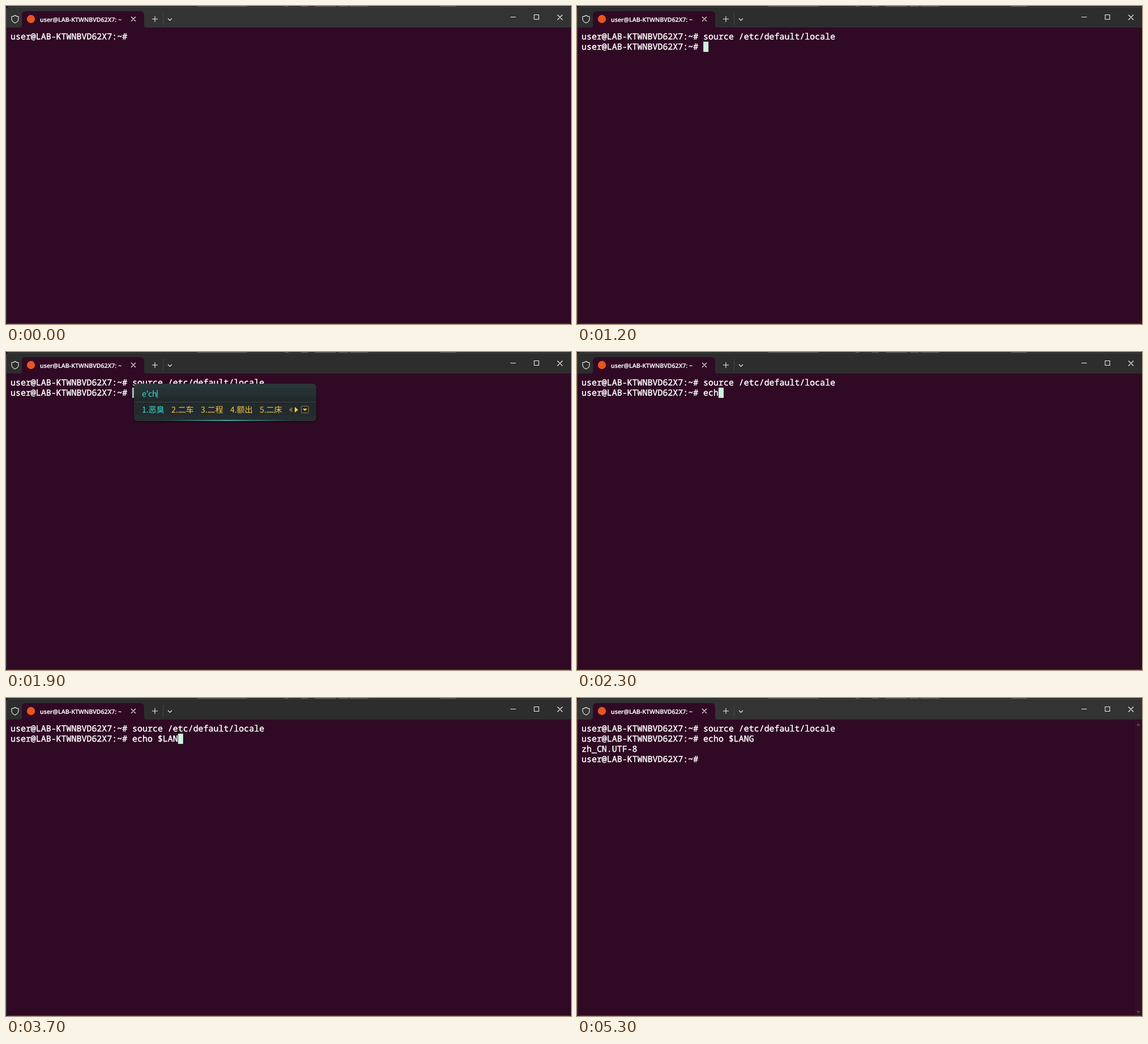
Write an HTML page that moves like this. It is 998x561 px and loops after 5400 ms.

```html
<!DOCTYPE html>
<html lang="en">
<head>
<meta charset="utf-8">
<title>Terminal</title>
<style>
  html, body { margin: 0; width: 100%; height: 100%; overflow: hidden; background: #1c1c1c; }
  svg { display: block; width: 998px; height: 561px; }
  text { white-space: pre; text-rendering: geometricPrecision; }
  .mono { font: 500 14.94px "Noto Sans Mono", "DejaVu Sans Mono", monospace; fill: #fff; stroke: #fff; stroke-width: .45; }
  .mono .inverse { fill: #300a24; stroke: #300a24; }
  .title { font: 600 10.6px "Open Sans", "Noto Sans", sans-serif; fill: #fff; stroke: #fff; stroke-width: .2; }
  .ime { font: 14.3px "Noto Sans CJK SC", "Noto Sans CJK", sans-serif; letter-spacing: -.2px; fill: #f2c443; }
  .ime.active { fill: #34dcd2; }
  .icon { fill: none; stroke: #f2f2f2; stroke-width: 1.1; }
</style>
</head>
<body>
<svg viewBox="0 0 998 561">
  <defs>
    <linearGradient id="panel" x2="0" y2="1">
      <stop stop-color="#2b3739"/><stop offset=".5" stop-color="#20282a"/><stop offset="1" stop-color="#262f31"/>
    </linearGradient>
    <linearGradient id="glow">
      <stop stop-color="#34dcd2" stop-opacity="0"/><stop offset=".5" stop-color="#4ff0e4"/><stop offset="1" stop-color="#34dcd2" stop-opacity="0"/>
    </linearGradient>
    <filter id="shadow" x="-5%" y="-10%" width="110%" height="125%">
      <feDropShadow dx="0" dy="1" stdDeviation="1.5" flood-opacity=".9"/>
    </filter>
  </defs>

  <!-- desktop edge and window -->
  <path d="M338 .5h88M492 .5h7M521 .5h12M546 .5h37M588 .5h16M607 .5h33M767 .5h28" stroke="#555"/>
  <rect id="bar" x=".5" y="1.5" width="1000" height="559" rx="6" stroke="#484848"/>
  <path d="M1 38H998V560H6Q1 560 1 555Z" fill="#300a24"/>
  <path d="M24 38Q28 38 28 34V16Q28 9 35 9H237Q244 9 244 16V34Q244 38 248 38Z" fill="#300a24"/>

  <!-- title bar -->
  <path class="icon" stroke="#c8c8c8" d="M16 16.5Q18.5 18.5 22 18.7V23Q22 27.5 16 30Q10 27.5 10 23V18.7Q13.5 18.5 16 16.5Z"/>
  <circle cx="44" cy="23" r="7.2" fill="#e95420"/>
  <text class="title" id="tab" x="60" y="27.5"></text>
  <path class="icon" d="M221 19l8 8m0-8l-8 8M258 23h10M263 18v10M286 22l3.5 3.5L293 22"/>
  <path d="M277.5 12v22" stroke="#484848"/>
  <path class="icon" d="M891 19.5h9.5M933 15.500h8v8h-8zM974 15.500l9 9m0-9l-9 9"/>

  <!-- terminal contents -->
  <rect id="selection" x="223" y="45" width="234" height="18" fill="#fdf3f9"/>
  <rect id="cursor" width="9" height="18" fill="#cdf5de"/>
  <g id="rows"></g>
  <g id="scrollbar">
    <path d="M985 38h13v522h-13z" fill="#340e28"/>
    <path d="M991.5 44l3.5 5h-7zM991.5 557l3.5-5h-7z" fill="#5c3b51"/>
  </g>

  <!-- input method panel -->
  <g id="ime">
    <rect id="panelBox" x="226" y="56" height="66" rx="6" fill="url(#panel)" filter="url(#shadow)"/>
    <path id="divider" stroke="#3b4648"/>
    <rect id="glowLine" x="270" y="120" height="1.2" fill="url(#glow)"/>
    <text class="ime active" id="composition" x="240" y="79"></text>
    <path id="caret" stroke="#34dcd2" stroke-width="1.2"/>
    <g id="candidates"></g>
    <g id="emoji">
      <rect x="440" y="92" width="19" height="19" fill="#4a4c4d"/>
      <path d="M444 99l4-2m4 0l3 3m-8 4l5 1m-1 3l4-2" stroke="#606263" stroke-width="2"/>
      <path d="M461 108h6l-3 3z" fill="#a58a32"/>
    </g>
    <g id="pager">
      <path d="M486.5 97v10l-6-5z" fill="#75683a"/>
      <path d="M491 97v10l6-5z" fill="#f5cf4a"/>
      <rect x="502.5" y="95.5" width="13" height="12" rx="1" fill="none" stroke="#8c7a3c"/>
      <path d="M505 100h8l-4 4z" fill="#f5cf4a"/>
    </g>
  </g>
</svg>
<script>
const LOOP = 5400, LEFT = 8, TOP = 45, CELL = 8.965, ROW = 17.93;
const HOST = "user@LAB-KTWNBVD62X7";
const PROMPT = HOST + ":~# ";
const SOURCE = "source /etc/default/locale";
const KEYS = [[2300, "ech"], [2400, "o"], [2600, " "], [3300, "$"], [3500, "L"], [3600, "A"], [3700, "N"], [3900, "G"]];
const COMPOSITIONS = [
  { from: 1700, text: "e", words: ["额", "鹅", "の", "(⊙o⊙)...", ""], xs: [239, 275, 314, 351, 430] },
  { from: 1800, text: "e'c", words: ["二次", "恶臭", "额错", "二层", "二测"] },
  { from: 1900, text: "e'ch", words: ["恶臭", "二车", "二程", "额出", "二床"] }
];

const $ = id => document.getElementById(id);
const within = (t, from, to) => t >= from && t < to;
const show = (id, visible) => $(id).setAttribute("visibility", visible ? "inherit" : "hidden");

function set(id, attributes) {
  for (const [name, value] of Object.entries(attributes)) $(id).setAttribute(name, value);
}

function addText(parent, className, x, y, content = "") {
  const node = document.createElementNS("http://www.w3.org/2000/svg", "text");
  node.setAttribute("class", className);
  node.setAttribute("x", x);
  node.setAttribute("y", y);
  node.textContent = content;
  $(parent).append(node);
  return node;
}

const rows = [0, 1, 2, 3].map(i => addText("rows", "mono", LEFT, TOP + 14.2 + i * ROW));
$("tab").textContent = HOST + ": ~";

function screenLines(t) {
  const typed = KEYS.filter(([at]) => t >= at).map(([, key]) => key).join("");
  const lines = [PROMPT + (t >= 1000 ? SOURCE : "")];
  if (t >= 1200) lines.push(PROMPT + typed);
  if (t >= 4000) lines.push(t >= 4100 ? "zh_CN.UTF-8" : "");
  if (t >= 4100) lines.push(PROMPT);
  return lines;
}

function drawTerminal(t) {
  const lines = screenLines(t);
  const selected = within(t, 1000, 1200);
  rows.forEach((row, i) => row.textContent = lines[i] || "");
  if (selected) rows[0].innerHTML = `${PROMPT}<tspan class="inverse">${SOURCE}</tspan>`;
  show("selection", selected);

  const last = lines.length - 1;
  set("cursor", { x: LEFT + lines[last].length * CELL, y: TOP + last * ROW });
  show("cursor", within(t, 200, 4600) || within(t, 5100, 5300));
  show("scrollbar", t >= 4900);
  $("bar").setAttribute("fill", within(t, 200, 5300) ? "#2d2d2d" : "#333");
}

function drawInputPanel(t) {
  const visible = within(t, 1700, 2300);
  show("ime", visible);
  if (!visible) return;
  const { text, words, xs } = COMPOSITIONS.findLast(c => t >= c.from);
  const shift = xs ? 0 : 19;
  set("panelBox", { width: 303 + shift });
  set("divider", { d: `M227 88.5H${528 + shift}` });
  set("glowLine", { width: 220 + shift });
  set("pager", { transform: `translate(${shift})` });
  show("emoji", Boolean(xs));

  $("composition").textContent = text;
  const caretX = 240.5 + $("composition").getComputedTextLength();
  set("caret", { d: `M${caretX} 67v14` });
  $("candidates").replaceChildren();
  words.forEach((word, i) =>
    addText("candidates", i ? "ime" : "ime active", xs ? xs[i] : 240 + 52 * i, 107, `${i + 1}.${word}`));
}

let start;
function frame() {
  const now = performance.now();
  start ??= now;
  const t = (now - start) % LOOP;
  drawTerminal(t);
  drawInputPanel(t);
  requestAnimationFrame(frame);
}
frame();
</script>
</body>
</html>
```
